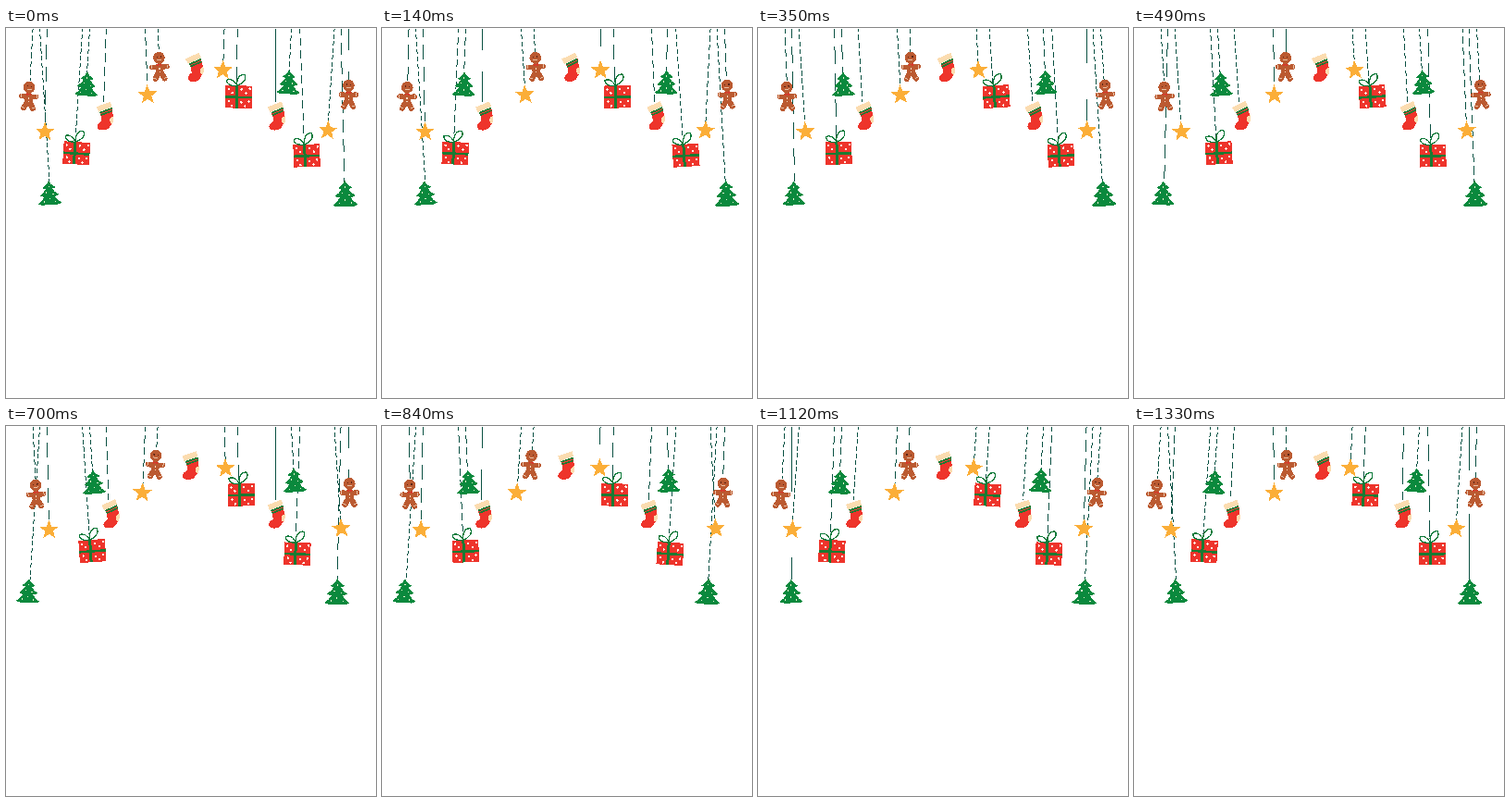
Animation of 400 by 400 pixels, one loop 1.4 s. Source, as an HTML page:

```html
<!DOCTYPE html>
<html lang="en">
<head>
<meta charset="utf-8">
<title>Hanging ornaments</title>
<style>
html, body { margin: 0; width: 100%; height: 100%; overflow: hidden; background: #fff; }
svg { display: block; width: 100vw; height: 100vh; }
</style>
</head>
<body>
<svg id="stage" viewBox="0 0 400 400" shape-rendering="crispEdges">
  <defs>
    <g id="star">
      <path id="starShape" fill="#fbae38"/>
    </g>

    <g id="tree">
      <path fill="#0a893d" d="M0-13.500Q2-9 7-6.500Q6-5 3.500-5Q5.500-1 10 1.500Q8.500 3.500 5.500 3.500Q8 8 12.500 10.500Q11 12.500 7 12.500H-8Q-11 12.500-12.500 11Q-8 8-5.500 3.500Q-9 3.500-10 2Q-5.500-1-3.500-5Q-6-5-7-6Q-2-9 0-13.500Z"/>
      <g id="treeDots" fill="#e6f2d0"></g>
    </g>

    <g id="gift">
      <path fill="#ee342b" d="M-14.300-12H14.300V12.300H-14.300Z"/>
      <g id="giftDots" fill="#fff0e6"></g>
      <path fill="#1a7a32" d="M-3.500-12H-.5V12.300H-3.500ZM-14.300-.8H14.300V1.800H-14.300Z"/>
      <path fill="none" stroke="#0b7a3a" stroke-width="1.300" d="M-2-12C-7-11-14-13-13-18C-8-20-4-16-2-12ZC-3-18 0-25 6-24C9-19 4-14-2-12Z"/>
    </g>

    <g id="sock">
      <path fill="#ee342b" d="M-6-4 7.500-9.500Q8-3 9.500 2Q10 7 6.500 10Q5 15-1 15.500Q-7.500 16-8 11.500Q-7.500 8-3.500 6Q-3 1-6-4Z"/>
      <path fill="#fbdcb0" d="M9.300 0Q4.500 2 5.500 5.500Q6 8 8 8.700Q10.500 5 9.300 0Z"/>
      <path fill="#fbdcb0" d="M-9.500-9.500 5.500-15.500 7.500-10-7-4Z"/>
      <path fill="#1a7a32" d="M-6-4 7.500-9.500 8-5-4 0Z"/>
      <path fill="none" stroke="#d9463a" d="M-5-2 7.500-7"/>
    </g>

    <g id="ginger">
      <g fill="none" stroke="#bb5a31" stroke-linecap="round">
        <path stroke-width="5.500" d="M-8 0Q0 1 8 0"/>
        <path stroke-width="6" d="M0 4-5 12.800M0 4 5 12.800"/>
        <path stroke-width="8.500" d="M0 0V5"/>
      </g>
      <circle cy="-9.800" r="6.300" fill="#bb5a31"/>
      <path fill="none" stroke="#f6dcc4" stroke-width=".8" d="M-8.500-2V2M8.500-2V2M-7.500 11.500-4 13M7.500 11.500 4 13M-2.500-8Q0-6 2.500-8"/>
      <path fill="#5b2415" d="M-2.700-11.500h1.200v1.200h-1.200ZM1.500-11.500h1.200v1.200h-1.200Z"/>
      <path fill="#d8382b" d="M-2.500-3.500 0-2.500 2.500-3.500V-.8L0-1.800-2.500-.8Z"/>
      <path fill="#f6dcc4" d="M-.6 1.500h1.200v1.200h-1.200ZM-.6 5h1.200v1.200h-1.200Z"/>
    </g>
  </defs>
  <path id="strings" fill="#0a5042"/>
  <g id="items"></g>
</svg>
<script>
const NS = 'http://www.w3.org/2000/svg';
const LOOP = 1400, STEP = 70, SWING = 3.8, TOP = 1;
const $ = id => document.getElementById(id);

function add(parent, tag, attrs) {
  const el = document.createElementNS(NS, tag);
  for (const k in attrs) el.setAttribute(k, attrs[k]);
  return parent.appendChild(el);
}

function dots(id, points, r) {
  for (const [cx, cy] of points) add($(id), 'circle', { cx, cy, r });
}

dots('treeDots', [[0, -7], [-3, -1], [4, 1], [-6, 9], [0, 6], [6, 9]], 0.7);
dots('giftDots', [[-11, -8], [-7, -4], [3, -8], [8, -4], [12, -9], [-10, 5], [-7, 10], [3, 6], [7, 10], [11, 5]], 1.2);

$('starShape').setAttribute('d', 'M' + Array.from({ length: 10 }, (_, i) => {
  const a = i * Math.PI / 5, r = i % 2 ? 4.6 : 11;
  return (r * Math.sin(a)).toFixed(2) + ' ' + (-r * Math.cos(a)).toFixed(2);
}).join('L') + 'Z');

// kind, pivot x, rest x, rest y, string end, time of rightmost swing, scale
const ornaments = [
  ['tree', 36.5, 35.5, 179, 166, 62],
  ['ginger', 29, 28.6, 74, 57, 560],
  ['star', 44.3, 44.3, 112.3, 101, 420],
  ['tree', 90.5, 91, 61, 48, 630],
  ['gift', 82.6, 84.8, 135.3, 123, 640],
  ['sock', 108.3, 110, 95, 80, 465],
  ['star', 150.5, 150.2, 72.3, 62, 210],
  ['ginger', 164, 163.7, 42, 27, 140],
  ['sock', 201.5, 201.7, 42.5, 0, 140],
  ['star', 236, 235.8, 45.7, 36, 460],
  ['gift', 250.2, 253, 74.3, 62, 420],
  ['tree', 308.5, 308.7, 59, 47, 560],
  ['sock', 291.5, 292.3, 95, 80, 345],
  ['gift', 317.8, 320, 138, 126, 218],
  ['star', 355, 355.2, 111, 101, 685],
  ['ginger', 370.5, 370.9, 72, 56, 375],
  ['tree', 362, 362.3, 179.5, 166, 268, 1.08]
].map(([kind, px, x, y, end, peak, scale = 1]) => {
  const el = add($('items'), 'g', {});
  add(el, 'use', { href: '#' + kind, transform: `translate(${x} ${y}) scale(${scale})` });
  return { el, px, end, peak };
});

// A hairline that breaks into dashes as it leans across pixel columns
function hairline(px, end, angle) {
  const slope = Math.tan(angle * Math.PI / 180);
  let d = '';
  for (let y = TOP; y < end; y++) {
    const dx = slope * (y - TOP);
    const cover = 2 * dx + 0.33;
    if (cover - Math.floor(cover) < 0.66) d += `M${Math.floor(px + dx)} ${y}h1v1h-1z`;
  }
  return d;
}

function draw(ms) {
  const t = Math.floor(ms % LOOP / STEP) * STEP;
  let d = '';
  for (const o of ornaments) {
    const angle = SWING * Math.cos(2 * Math.PI * (t - o.peak) / LOOP);
    o.el.setAttribute('transform', `rotate(${(-angle).toFixed(3)} ${o.px} ${TOP})`);
    d += hairline(o.px, o.end, angle);
  }
  $('strings').setAttribute('d', d);
}

const start = performance.now();
let last = -1;
function tick() {
  const ms = performance.now() - start;
  const step = Math.floor(ms / STEP);
  if (step !== last) draw(ms);
  last = step;
  requestAnimationFrame(tick);
}
tick();
</script>
</body>
</html>
```
